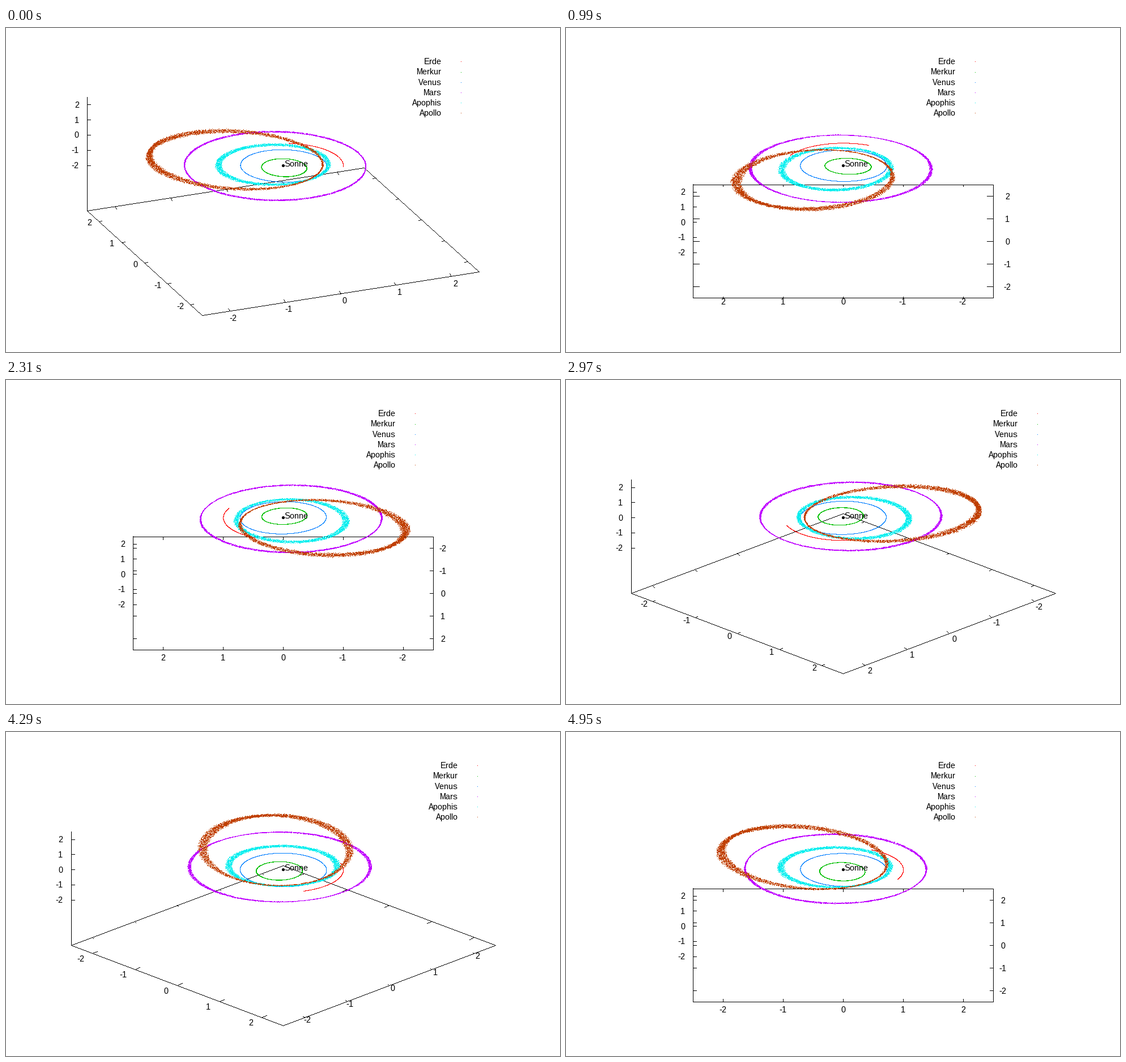
A matplotlib script that plays this animation: 978 by 573 pixels, repeating every 5.28 s.

```python
import numpy as np
import matplotlib.pyplot as plt
from matplotlib.animation import FuncAnimation

W, H = 978, 573
FRAMES, INTERVAL = 16, 330
CX, BASE_Y, SUN_Y = 489.2, 378.2, 244.3
SX, SY, SZ = 105.9, 40.0, 26.8      # pixels per unit
LIM = 2.5
TICKS = range(-2, 3)

plt.rcParams["font.family"] = "Liberation Sans"
plt.rcParams["text.hinting"] = "native"
plt.rcParams["text.hinting_factor"] = 1
rng = np.random.default_rng(7)

fig = plt.figure(figsize=((W + 0.01) / 100, (H + 0.01) / 100), dpi=100,
                 facecolor="white")
ax = fig.add_axes([0, 0, 1, 1])


def orbit(n, a, e, peri, node, incl, da=0.0, dperi=0.0, dincl=0.0):
    """Points spread evenly in time on a slowly drifting Kepler ellipse."""
    def spread(width):
        return width * rng.uniform(-1, 1, n)

    a = a + spread(da)
    peri = np.radians(peri) + spread(dperi)
    incl = np.radians(incl + spread(dincl))
    node = np.radians(node)
    mean = 2 * np.pi * (np.arange(n) + rng.uniform(0, 1, n)) / n
    ecc = mean.copy()
    for _ in range(12):
        ecc -= (ecc - e * np.sin(ecc) - mean) / (1 - e * np.cos(ecc))
    r = a * (1 - e * np.cos(ecc))
    anomaly = np.arctan2(np.sqrt(1 - e * e) * np.sin(ecc), np.cos(ecc) - e)
    w = anomaly + peri - node
    u, v = np.cos(w), np.sin(w) * np.cos(incl)
    return np.array([r * (np.cos(node) * u - np.sin(node) * v),
                     r * (np.sin(node) * u + np.cos(node) * v),
                     r * np.sin(w) * np.sin(incl)])


arc = np.radians(np.linspace(-25.3, 62, 500))
BODIES = [
    ("Erde", "#ff0000", np.array([np.cos(arc), np.sin(arc), 0 * arc])),
    ("Merkur", "#00c000", orbit(2500, .387, .2056, 77.5, 48.3, 7.0, .004)),
    ("Venus", "#0080ff", orbit(2500, .7205, .0068, 131, 76.7, 3.39)),
    ("Mars", "#c000ff",
     orbit(5000, 1.512, .0915, 341, 49.6, 1.85, .006, .2)),
    ("Apophis", "#00eeee",
     orbit(4000, .92, .191, 318, 204.4, 3.33, .042, .14)),
    ("Apollo", "#c04000",
     orbit(6000, 1.465, .56, 323.5, 35.6, 6.1, .025, .075, 1.1)),
]

# Label offset factors for an edge turned by 0, 22.5, 45, 67.5 and 90 degrees
TURNS = np.linspace(0, 90, 5)
RIGHT = [0, .27, .37, .9, 1]
LEFT = [0, .38, .78, .95, 1]


def pixels(x, y, color="black"):
    ax.plot(np.rint(x), np.rint(y), ",", color=color)


def segment(p, q):
    p, q = np.rint(p), np.rint(q)
    n = int(max(abs(q - p))) + 1
    pixels(np.linspace(p[0], q[0], n), np.linspace(p[1], q[1], n))


def label(x, y, text, ha="center"):
    """Text whose capitals are centred on y."""
    ax.text(x, y + 4.3, text, ha=ha, va="baseline", fontsize=11)


def project(x, y, c, s):
    return np.array([CX + SX * (x * c - y * s), BASE_Y - SY * (x * s + y * c)])


def draw_axis(point, outward, tick_size, label_size):
    """Ticks on both edges of one base axis, labels on the front edge."""
    def rank(side):
        px, py = point(0, side * LIM)
        return py + 1e-3 * px

    side = max((-1, 1), key=rank)
    ox, oy = outward * side
    turn = np.degrees(np.arctan2(abs(ox), abs(oy)))
    fx = np.sign(ox) * np.interp(turn, TURNS, RIGHT if ox > 0 else LEFT)
    shift = np.array([fx, oy])
    for v in TICKS:
        near, far = point(v, side * LIM), point(v, -side * LIM)
        segment(near, near - shift * tick_size)
        segment(far, far + shift * tick_size)
        x, y = near + shift * label_size
        label(x - 0.8 * (v < 0), y, str(v))


def draw_box(c, s):
    corners = [project(x * LIM, y * LIM, c, s)
               for x, y in ((-1, -1), (1, -1), (1, 1), (-1, 1))]
    for p, q in zip(corners, corners[1:] + corners[:1]):
        segment(p, q)

    draw_axis(lambda v, e: project(v, e, c, s), np.array([-s, -c]),
              np.array([11, 5]), np.array([25.5, 13.3]))
    draw_axis(lambda v, e: project(e, v, c, s), np.array([c, -s]),
              np.array([6, 2.6]), np.array([17.5, 6.5]))

    x, y = min(corners, key=lambda p: p[0] - 1e-3 * p[1])
    segment((x, y), (x, y - 7.5 * SZ))
    for v in TICKS:
        ty = y - (v + 2 * LIM) * SZ
        segment((x, ty), (x + 6, ty))
        label(x - 14.5, ty, str(v), "right")
    return max(p[0] for p in corners)


def draw_sun():
    d = np.arange(-2, 3)
    gx, gy = np.meshgrid(d, d)
    disc = gx ** 2 + gy ** 2 < 6
    pixels(489 + gx[disc], 244 + gy[disc])
    label(491.5, 240.7, "Sonne", "left")


def update(k):
    ax.clear()
    ax.set(xlim=(0, W), ylim=(H, 0))
    ax.axis("off")
    angle = np.radians(22.5 * (k + 1))
    c, s = np.cos(angle), np.sin(angle)

    right = draw_box(c, s)
    for i, (name, color, (x, y, z)) in enumerate(BODIES):
        px, py = project(x, y, c, s)
        pixels(px, py - BASE_Y + SUN_Y - z * SZ, color)
        row = 60 + 18.15 * i
        label(right - 66, row, name, "right")
        pixels([right - 32], [row + 0.5], color)
    draw_sun()
    return ax.lines[:] + ax.texts[:]


anim = FuncAnimation(fig, update, frames=FRAMES, interval=INTERVAL,
                     init_func=lambda: [], repeat=True, repeat_delay=0,
                     blit=False)
plt.show()
```
